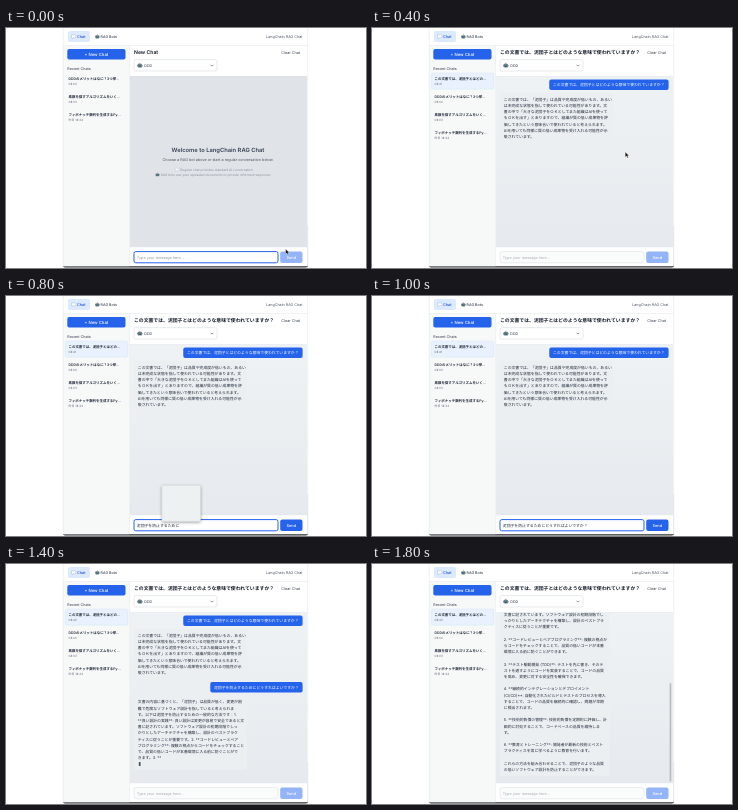
These frames come from a looping animation (360 px wide and 240 px high, 1900 ms). An HTML page:

```html
<!DOCTYPE html>
<html lang="ja">
<head>
<meta charset="utf-8">
<title>RAG Chat</title>
<style>
  html, body { margin: 0; width: 100%; height: 100%; overflow: hidden; background: #fff; }
  svg { display: block; width: 360px; height: 240px; }
  text { font-family: Inter, "Noto Sans CJK JP", "Noto Sans CJK", sans-serif; white-space: pre; text-rendering: geometricPrecision; }
</style>
</head>
<body>
<svg id="stage" viewBox="0 0 360 240" xmlns="http://www.w3.org/2000/svg">
  <defs>
    <clipPath id="view"><rect x="124" y="48" width="177" height="171"/></clipPath>
    <linearGradient id="page" x2="0" y2="1"><stop stop-color="#eff2f5"/><stop offset="1" stop-color="#e6eaee"/></linearGradient>
    <filter id="soft" x="-20%" y="-20%" width="140%" height="150%"><feDropShadow dx="0" dy="1" stdDeviation="1.4" flood-opacity=".4"/></filter>
  </defs>
  <g id="base"></g>
  <g id="side"></g>
  <g id="head"></g>
  <g id="chat" clip-path="url(#view)"></g>
  <g id="foot"></g>
</svg>
<script>
const TICK = 100, TICKS = 19, ROW = 6.2, SIZE = 3.86, BOTTOM = 205.5;
const BLUE = '#2563eb', INK = '#1f2937';
const QUESTION = 'この文書では、泥団子とはどのような意味で使われていますか？';
const FOLLOWUP = '泥団子を防止するためにどうすればよいですか？';

const ANSWER = `この文書では、「泥団子」は品質や完成度が低いもの、あるい
は未完成な状態を指して使われている可能性があります。文
書の中で「大きな泥団子をＯＫとしてまた組織はAIを使って
もＯＫを出す」とありますので、組織が質の低い成果物を評
価してきたという意味合いで使われていると考えられます。
AIを用いても同様に質の低い成果物を受け入れる可能性が示
唆されています。`.split('\n');

const ANSWER_NARROW = `この文書では、「泥団子」は品質や完成度が低いもの、ある
いは未完成な状態を指して使われている可能性があります。
文書の中で「大きな泥団子をＯＫとしてまた組織はAIを
使ってもＯＫを出す」とありますので、組織が質の低い
成果物を評価してきたという意味合いで使われていると考
えられます。AIを用いても同様に質の低い成果物を受け入
れる可能性が示唆されています。`.split('\n');

const STREAM = `文書の内容に基づくと、「泥団子」は品質が低く、変更が困
難で危険なソフトウェア設計を指していると考えられま
す。以下は泥団子を防止するための一般的な方法です：1.
**良い設計の実践**: 良い設計は変更が容易で安全であると文
書に記されています。ソフトウェア設計の初期段階でしっ
かりとしたアーキテクチャを構築し、設計のベストプラク
ティスに従うことが重要です。2. **コードレビューとペア
プログラミング**: 複数の視点からコードをチェックすること
で、品質の低いコードが本番環境に入る前に防ぐことがで
きます。3. **テスト駆動開発 (TDD)**: テストを先に書き、
そのテストを通すようにコードを実装することで、コード
の品質を高め、変更に対する安全性を確保できます。
4. **継続的インテグレーションとデプロイメント
(CI/CD)**: 自動化されたビルドとテストのプロセスを導入
することで、コードの品質を継続的に確認し、問題が早期
に検出されます。5. **技術的負債
の管理**: 技術的負債を定期的に評価し、計画的に対処する
ことで、コードベースの品質を維持します。6. **教育とト
レーニング**: 開発者が最新の技術とベストプラクティスを
常に学べるように教育を行います。これらの方法を組み合
わせることで、泥団子のような品質の低いソフトウェア設
計を防止することができます。`.split('\n');

const FINAL = `文書の内容に基づくと、「泥団子」は品質が低く、変更が
困難で危険なソフトウェア設計を指していると考えられます。
以下は泥団子を防止するための一般的な方法です：

1. **良い設計の実践**: 良い設計は変更が容易で安全であると
文書に記されています。ソフトウェア設計の初期段階でし
っかりとしたアーキテクチャを構築し、設計のベストプラ
クティスに従うことが重要です。

2. **コードレビューとペアプログラミング**: 複数の視点か
らコードをチェックすることで、品質の低いコードが本番
環境に入る前に防ぐことができます。

3. **テスト駆動開発 (TDD)**: テストを先に書き、そのテ
ストを通すようにコードを実装することで、コードの品質
を高め、変更に対する安全性を確保できます。

4. **継続的インテグレーションとデプロイメント
(CI/CD)**: 自動化されたビルドとテストのプロセスを導入
することで、コードの品質を継続的に確認し、問題が早期
に検出されます。

5. **技術的負債の管理**: 技術的負債を定期的に評価し、計
画的に対処することで、コードベースの品質を維持しま
す。

6. **教育とトレーニング**: 開発者が最新の技術とベスト
プラクティスを常に学べるように教育を行います。

これらの方法を組み合わせることで、泥団子のような品質
の低いソフトウェア設計を防止することができます。`.split('\n');

const put = (id, markup) => { document.getElementById(id).innerHTML = markup; };
const rect = (x, y, w, h, fill, r = 0, extra = '') =>
  `<rect x="${x}" y="${y}" width="${w}" height="${h}" rx="${r}" fill="${fill}" ${extra}/>`;
// y is the middle of the line
const text = (x, y, s, size, fill = INK, weight = 400, anchor = 'start') =>
  `<text x="${x}" y="${y + size * .37}" font-size="${size}" fill="${fill}" font-weight="${weight}" text-anchor="${anchor}">${s}</text>`;
const line = (x1, y1, x2, y2, color = '#e2e5e9', w = .5) =>
  `<path d="M${x1} ${y1}L${x2} ${y2}" stroke="${color}" stroke-width="${w}"/>`;

const robot = (x, y, s = 1) => `<g transform="translate(${x} ${y}) scale(${s})">` +
  rect(-.3, -2.3, .6, 1, '#b4552f') + rect(-2, -1.4, 4, 3.4, '#6b8791', .7) +
  rect(-2.4, -.4, .5, 1.3, '#4b626b') + rect(1.9, -.4, .5, 1.3, '#4b626b') +
  rect(-1.2, -.6, .8, .8, '#183b46', .4) + rect(.4, -.6, .8, .8, '#183b46', .4) +
  rect(-1, .9, 2, .5, '#29434c') + '</g>';
const balloon = (x, y, s = 1) => `<path transform="translate(${x} ${y}) scale(${s})"
  d="M-2.2 -1.5h4.4v2.6h-2.6l-1.2 1v-1h-.6z" fill="#fff" stroke="#9db4c8" stroke-width=".4" stroke-linejoin="round"/>`;
const pointer = ([x, y]) => `<path transform="translate(${x} ${y})"
  d="M0 0V5.2L1.3 4.1L2.2 6.1L3.1 5.7L2.3 3.8H3.9Z" fill="#111" stroke="#fff" stroke-width=".4"/>`;

function drawBase() {
  put('base',
    rect(57, 0, 245, 239.5, '#2a2d31', 2) + rect(57, 0, 245, 238.2, '#fff', 1) +
    rect(57, 17.5, 66.5, 220.7, '#f7f9f9') +
    line(57.2, 0, 57.2, 238, '#dfe3e6') + line(301.7, 0, 301.7, 198) + line(301.7, 198, 301.7, 238, '#c3cad3') +
    line(57, 17.5, 302, 17.5) + line(123.6, 17.5, 123.6, 238) +
    rect(62, 3, 22, 11, '#dbeafe', 1.8) + balloon(67.7, 8.5) +
    text(71, 8.5, 'Chat', 3.75, '#1d4ed8', 500) +
    robot(91.3, 8.5, .95) + text(94.6, 8.5, 'RAG Bots', 3.65, '#374151', 500) +
    text(296.5, 8.5, 'LangChain RAG Chat', 3.7, '#4b5563', 400, 'end') +
    rect(61.3, 21, 58.2, 10.5, BLUE, 1.9) + text(90.4, 26.2, '+ New Chat', 4.25, '#fff', 500, 'middle') +
    text(61.3, 40.4, 'Recent Chats', 3.7, '#4b5563', 500) +
    text(294, 24.3, 'Clear Chat', 3.75, '#374151', 400, 'end') +
    rect(128, 31.7, 83, 11.3, '#fff', 1.6, 'stroke="#cdd2d9" stroke-width=".5"') +
    robot(133.8, 37.4, 1.1) + text(138.3, 37.4, 'DDD', 3.6) +
    '<path d="M204.6 36.8L205.9 38.1L207.2 36.8" fill="none" stroke="#374151" stroke-width=".6"/>');
}

function drawSide(k) {
  const items = [
    ['DDDのメリットはなに？3つ挙...', '08:00'],
    ['素数を探すアルゴリズムをいく...', '08:03'],
    ['フィボナッチ数列を生成するPy...', '昨日 18:34']];
  const started = k > 1;
  if (started) items.unshift(['この文書では、泥団子とはどの...', k < 12 ? '08:41' : '08:42']);
  put('side', (started ? rect(59.2, 45, 62.6, 16.2, '#e8f1fd', 1.8, 'stroke="#cfe0f6" stroke-width=".4"') : '') +
    items.map(([name, time], i) =>
      text(62.5, 50.5 + 18 * i, name, 3.46, INK, 600) +
      text(62.5, 55.9 + 18 * i, time, 3, '#6b7280')).join(''));
  put('head', started ? text(128, 24.3, QUESTION, 4.85, '#111827', 600)
                      : text(128, 24.3, 'New Chat', 5.15, '#111827', 600));
}

const asked = (s, y, right) => {
  const w = s.length * SIZE + 7.4;
  return rect(right - w, y - 5.3, w, 10.6, BLUE, 2) + text(right - w + 3.7, y, s, SIZE, '#fff');
};
const reply = (rows, y, w) =>
  rect(128, y - 6.2, w, (rows.length - 1) * ROW + 12.4, '#eceff2', 2) +
  rows.map((s, i) => text(131.8, y + i * ROW, s, SIZE)).join('');

function reveal(rows, n) {
  const out = [];
  for (const s of rows) {
    if (n <= 0) break;
    out.push(s.slice(0, n));
    n -= s.length;
  }
  return out;
}

function drawChat(k) {
  if (k < 2) {
    const grey = '#8b929d';
    put('chat', rect(124, 48, 177.5, 171, '#e0e4e8') + line(124, 48, 302, 48, '#d3d8de') +
      text(212, 122, 'Welcome to LangChain RAG Chat', 5.8, '#374151', 600, 'middle') +
      text(212, 131.5, 'Choose a RAG bot above or start a regular conversation below.', 3.75, '#4b5563', 400, 'middle') +
      balloon(171, 141.6, .85) + text(174.3, 141.5, 'Regular chat provides standard AI conversation', 3.25, grey) +
      robot(151.5, 146.6, .85) + text(154.8, 146.5, 'RAG bots use your uploaded documents to provide informed responses', 3.25, grey));
    return;
  }
  let rows = [], caret = '';
  if (k > 12) {
    rows = k === 18 ? FINAL : reveal(STREAM, Math.round((k - 12.35) * 155));
    if (k < 18) caret = rect(132.8, -2, 1.8, 4, '#4b5563', .3);
  }
  const top = 137.9, last = rows.length - (caret ? 0 : 1);
  const y = Math.min(top, BOTTOM - ROW * last), shift = y - top;
  const narrow = shift < -.5;
  const right = narrow ? 293.2 : 296.6, width = narrow ? 109.5 : 113;
  let out = rect(124, 48, 177.5, 171, 'url(#page)') + line(124, 48, 302, 48, '#dde1e6') +
    asked(QUESTION, 56.8 + shift, right);
  if (k > 2) out += reply(k === 3 ? reveal(ANSWER, 92) : narrow ? ANSWER_NARROW : ANSWER, 71.3 + shift, width);
  if (k > 11) out += asked(FOLLOWUP, 123.2 + shift, right);
  if (rows.length) out += reply(caret ? rows.concat('') : rows, y, width);
  if (caret) out += `<g transform="translate(0 ${y + ROW * last})">${caret}</g>`;
  if (narrow) {
    const h = 171 * 171 / (177 - shift);
    out += rect(297.6, 218 - h, 1.7, h - .5, '#b9bdc2', .85);
  }
  put('chat', out);
}

const typed = { 1: QUESTION, 7: FOLLOWUP.slice(0, 4), 8: FOLLOWUP.slice(0, 11), 9: FOLLOWUP.slice(0, 17), 10: FOLLOWUP, 11: FOLLOWUP };
const mouse = { 0: [279.6, 221], 2: [252.4, 88], 3: [252.8, 106], 4: [253.2, 124], 5: [236, 168], 6: [214, 226], 11: [282, 227], 12: [235.3, 143.6] };

function drawFoot(k) {
  const focus = k < 2 || (k > 5 && k < 12), value = typed[k];
  const edge = focus ? `stroke="${BLUE}" stroke-width="1"` : 'stroke="#d5dae0" stroke-width=".5"';
  put('foot', line(124, 219, 302, 219) +
    rect(128, 223.6, 144, 11.2, focus ? '#fff' : '#fafbfb', 1.8, edge) +
    text(130.8, 229.3, value || 'Type your message here...', value ? SIZE : 3.78, value ? INK : focus ? '#8f96a1' : '#a9afb8') +
    rect(274.2, 223.5, 22.3, 11.4, value ? BLUE : '#93b4f6', 1.9) +
    text(285.3, 229.2, 'Send', 3.9, '#fff', 500, 'middle') +
    (k === 8 ? rect(156, 189.3, 38.5, 36, '#edf1f1', 1, 'filter="url(#soft)" stroke="#c9cfd0" stroke-width=".4"') : '') +
    (mouse[k] ? pointer(mouse[k]) : ''));
}

let shown = -1;
function update(ms) {
  const k = Math.floor(ms / TICK) % TICKS;
  if (k !== shown) {
    shown = k;
    drawSide(k);
    drawChat(k);
    drawFoot(k);
  }
}

drawBase();
update(0);
const start = performance.now();
(function loop() {
  update(performance.now() - start);
  requestAnimationFrame(loop);
})();
</script>
</body>
</html>
```
